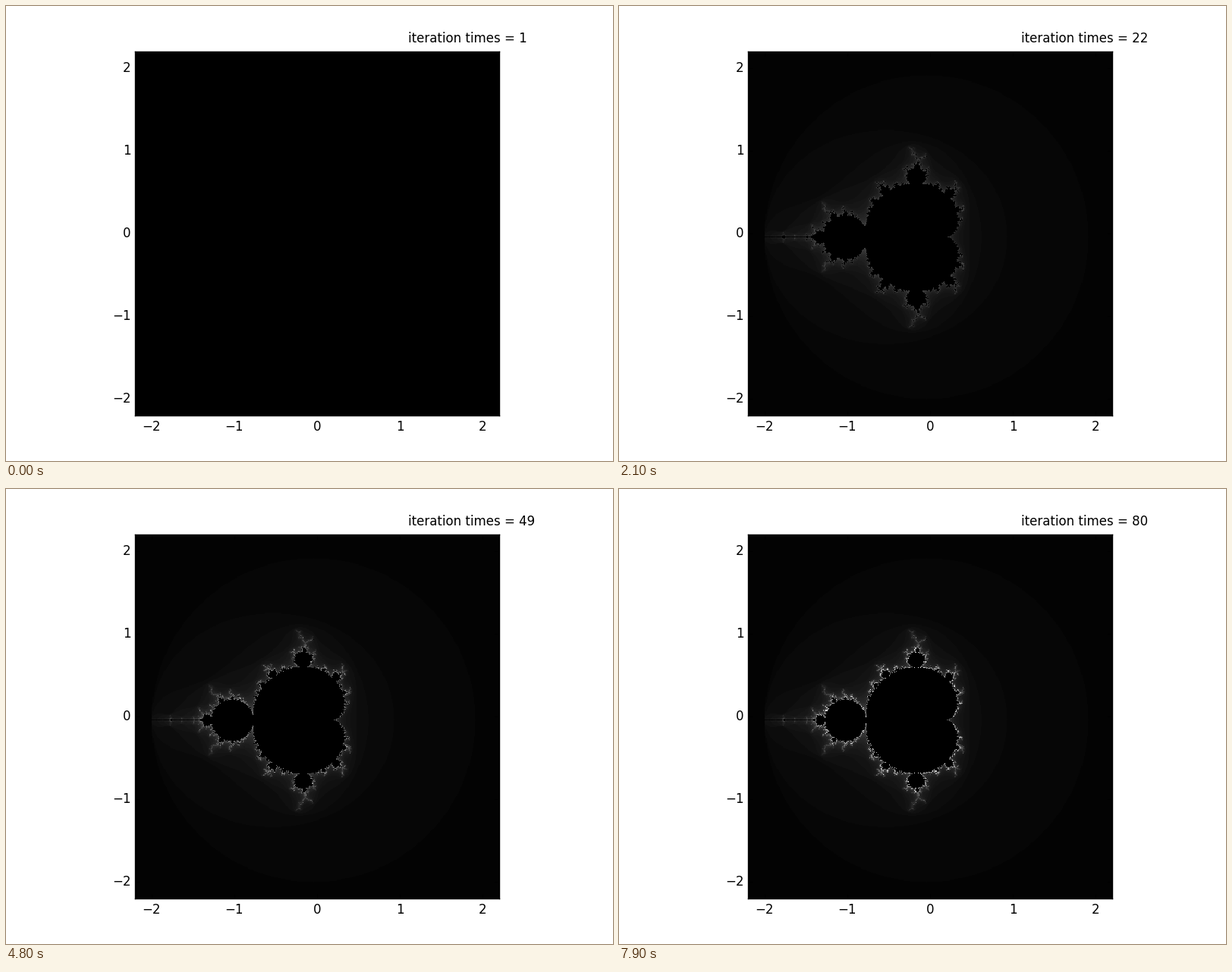
A matplotlib script that plays this animation: 800x600 px, repeating every 8 s.

```python
import numpy as np
import matplotlib.pyplot as plt
from matplotlib.animation import FuncAnimation

STEPS = 80
LIMIT = 2.2

plt.rcParams.update({
    "font.family": "DejaVu Sans",
    "font.size": 12,
    "axes.unicode_minus": True,
})


def escape_counts(steps):
    """Index of the first z with |z| > 2 for each point, or `steps` if none."""
    axis = np.arange(-220, 230) / 100
    c = axis[None, :] + 1j * axis[:, None]
    z = np.zeros_like(c)
    counts = np.full(c.shape, steps)
    active = np.ones(c.shape, bool)
    for k in range(steps):
        escaped = active & (np.abs(z) > 2)
        counts[escaped] = k
        active &= ~escaped
        z[active] = z[active] ** 2 + c[active]
    return counts


counts = escape_counts(STEPS)

fig = plt.figure(figsize=(8, 6), dpi=100, facecolor="white")
ax = fig.add_axes([170 / 800, 0.1, 0.6, 0.8])
image = ax.imshow(np.zeros(counts.shape), cmap="gray", vmin=0, vmax=STEPS,
                  origin="lower", interpolation="nearest", aspect="auto",
                  extent=(-LIMIT, LIMIT, -LIMIT, LIMIT))
ax.set_xticks(range(-2, 3))
ax.set_yticks(range(-2, 3))
ax.tick_params(direction="in", length=4, width=0.5, pad=4, top=True, right=True)
for label in ax.get_yticklabels():
    label.set_verticalalignment("center")
for spine in ax.spines.values():
    spine.set_linewidth(1)
caption = ax.text(LIMIT * 0.5, LIMIT * 1.05, "")


def update(frame):
    times = frame + 1
    image.set_data(np.where(counts < times, counts, 0))
    caption.set_text(f"iteration times = {times}")
    return image, caption


anim = FuncAnimation(fig, update, frames=STEPS, interval=100, repeat=True)
plt.show()
```
